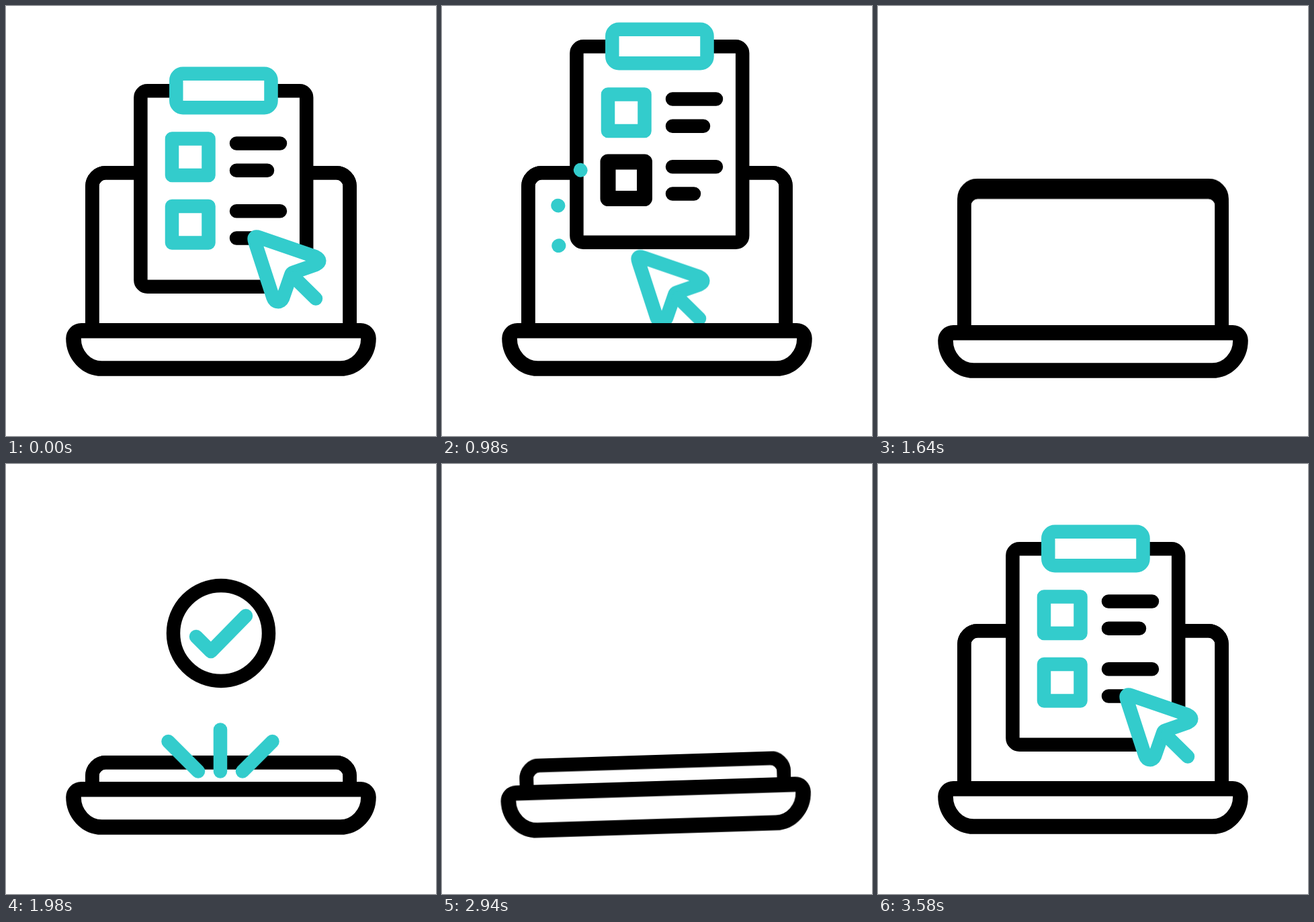
An HTML page that plays this animation: 640 by 640 pixels, repeating every 3600 ms.

```html
<!DOCTYPE html>
<html lang="en">
<head>
<meta charset="utf-8">
<title>Online checklist</title>
<style>
  html, body { margin: 0; width: 100%; height: 100%; overflow: hidden; background: #fff; }
  svg { display: block; width: 100vw; height: 100vh; }
  g, path, rect, use {
    stroke-linecap: round; stroke-linejoin: round;
  }
  .ink { fill: none; stroke: #000; stroke-width: 20.5; }
  .teal { fill: none; stroke: #3cc; stroke-width: 20.5; }
  .paper { fill: #fff; }

  .shift, .wobble, .lid, .gap, .sheet, .cursor, .badge, .spark, .ray, .mark {
    animation: 3600ms ease-in-out infinite;
  }
  .shift { animation-name: shift; }
  .wobble { animation-name: wobble; transform-origin: 320px 551px; }
  .lid { animation-name: lid; }
  .gap { animation-name: gap; }
  .sheet { animation-name: sheet; }
  .cursor { animation-name: cursor; }
  .badge { animation-name: badge; }
  .spark, .ray, .mark { stroke-dasharray: 1 2; }
  .spark { animation-name: spark; }
  .ray { animation-name: ray; }
  .mark { animation-name: mark; stroke-width: 23; }

  /* laptop sinks a little when the sheet lands in it */
  @keyframes shift {
    0%, 41.5% { transform: translateY(0); }
    42.2%, 45.54% { transform: translateY(1px); }
    45.55% { transform: translateY(3px); }
    61%, 100% { transform: translateY(0); }
  }
  @keyframes wobble {
    0%, 55.56% { transform: rotate(0deg); }
    61.11%, 72.22% { transform: rotate(10deg); }
    66.67%, 77.78% { transform: rotate(-10deg); }
    83.33%, 100% { transform: rotate(0deg); }
  }
  @keyframes lid {
    0%, 45.54% { transform: translateY(0); }
    45.55% { transform: translateY(15px); animation-timing-function: cubic-bezier(.3, .3, .58, 1); }
    55%, 81.5% { transform: translateY(195px); }
    88%, 100% { transform: translateY(0); }
  }
  @keyframes gap {
    0%, 45.54% { transform: translateY(0); }
    45.55% { transform: translateY(10px); }
    50%, 100% { transform: translateY(0); }
  }
  @keyframes sheet {
    0%, 15.5% { transform: translateY(0); }
    27%, 28% { transform: translateY(-66px); }
    41.1%, 80.3% { transform: translateY(400px); }
    92.36% { transform: translateY(-66px); }
    99.2%, 100% { transform: translateY(0); }
  }
  @keyframes cursor {
    0% { transform: translate(0, 0); }
    12%, 23.4% { transform: translate(-78px, -14px); }
    34.5%, 60% { transform: translate(-78px, 160px); }
    60.01%, 80.6% { transform: translate(11px, 160px); }
    98.3%, 100% { transform: translate(0, 0); }
  }
  @keyframes badge {
    0%, 45.6% { transform: translateY(305px); }
    54.9%, 75% { transform: translateY(0); }
    81%, 100% { transform: translateY(305px); }
  }
  @keyframes spark {
    0%, 16% { stroke-dashoffset: 1; opacity: 0; }
    16.01% { stroke-dashoffset: .99; opacity: 1; }
    22% { stroke-dashoffset: 0; }
    27.5% { stroke-dashoffset: -.99; opacity: 1; }
    27.51%, 100% { stroke-dashoffset: -.99; opacity: 0; }
  }
  @keyframes ray {
    0%, 49% { stroke-dashoffset: 1; opacity: 0; }
    49.01% { stroke-dashoffset: .99; opacity: 1; }
    54.5%, 55.2% { stroke-dashoffset: 0; }
    60.5% { stroke-dashoffset: -.99; opacity: 1; }
    60.51%, 100% { stroke-dashoffset: -.99; opacity: 0; }
  }
  @keyframes mark {
    0%, 16% { stroke-dashoffset: 1; opacity: 0; }
    16.01% { stroke-dashoffset: .99; opacity: 1; }
    24%, 60% { stroke-dashoffset: 0; opacity: 1; }
    60.01%, 100% { stroke-dashoffset: 0; opacity: 0; }
  }
</style>
</head>
<body>
<svg viewBox="0 0 640 640">
  <defs>
    <clipPath id="above"><rect width="640" height="520"/></clipPath>
    <clipPath id="hinge"><rect width="640" height="490"/></clipPath>
    <path id="frame" d="M128.3 480V268.3a20 20 0 0 1 20-20H491.7a20 20 0 0 1 20 20V480"/>
    <path id="box" d="M247 197.5h54.5v54.5h-54.5z"/>
  </defs>

  <g class="shift">
    <g class="wobble">
      <g clip-path="url(#hinge)">
        <g class="lid ink">
          <use href="#frame"/>
          <use class="gap" href="#frame"/>
        </g>
      </g>
    </g>

    <g clip-path="url(#above)">
      <g class="sheet">
        <rect class="ink paper" x="200.4" y="126.2" width="246.8" height="291.5" rx="10"/>
        <rect class="teal paper" x="253.3" y="100.7" width="141.2" height="50.5" rx="10"/>
        <use class="teal" href="#box"/>
        <use class="teal" href="#box" y="100.5"/>
        <path class="ink" d="M343 204.5h65M343 244.7h46M343 305.2h65M343 345.5h32"/>
        <path class="ink mark" pathLength="1" d="M247 298h54.5v54.5h-54.5z"/>
      </g>

      <g class="teal">
        <path class="spark" pathLength="1" d="M235.5 279L206 244"/>
        <path class="spark" pathLength="1" d="M216.2 308.8L172.5 297"/>
        <path class="spark" pathLength="1" d="M216.8 343.1L173.5 356.8"/>
      </g>

      <g class="cursor">
        <path class="paper" d="M367 341L474 380L470 436L405 448z"/>
        <path class="teal paper" d="M370.5 351Q367 341 377 344.5L460 373Q472 379 461 385L428 396.5Q425 397.5 424 400.5L412 435C409 442 400 442 397.5 434z"/>
        <path class="teal" d="M430 405L461 435.5"/>
      </g>

      <g class="badge">
        <circle class="ink paper" cx="320" cy="251" r="71"/>
        <path class="teal" d="M283 256L305 278L357 225"/>
      </g>

      <g class="teal">
        <path class="ray" pathLength="1" d="M286 456.5L241.5 412"/>
        <path class="ray" pathLength="1" d="M319 456.5V394.5"/>
        <path class="ray" pathLength="1" d="M352 456.5L396.5 412"/>
      </g>
    </g>

    <g class="wobble">
      <path class="ink paper" style="stroke-width:22.6" d="M112 483.3H528a11.5 11.5 0 0 1 11.5 11.5A42 44.7 0 0 1 497.5 539.5H142.5A42 44.7 0 0 1 100.5 494.8A11.5 11.5 0 0 1 112 483.3z"/>
    </g>
  </g>
</svg>
</body>
</html>
```
